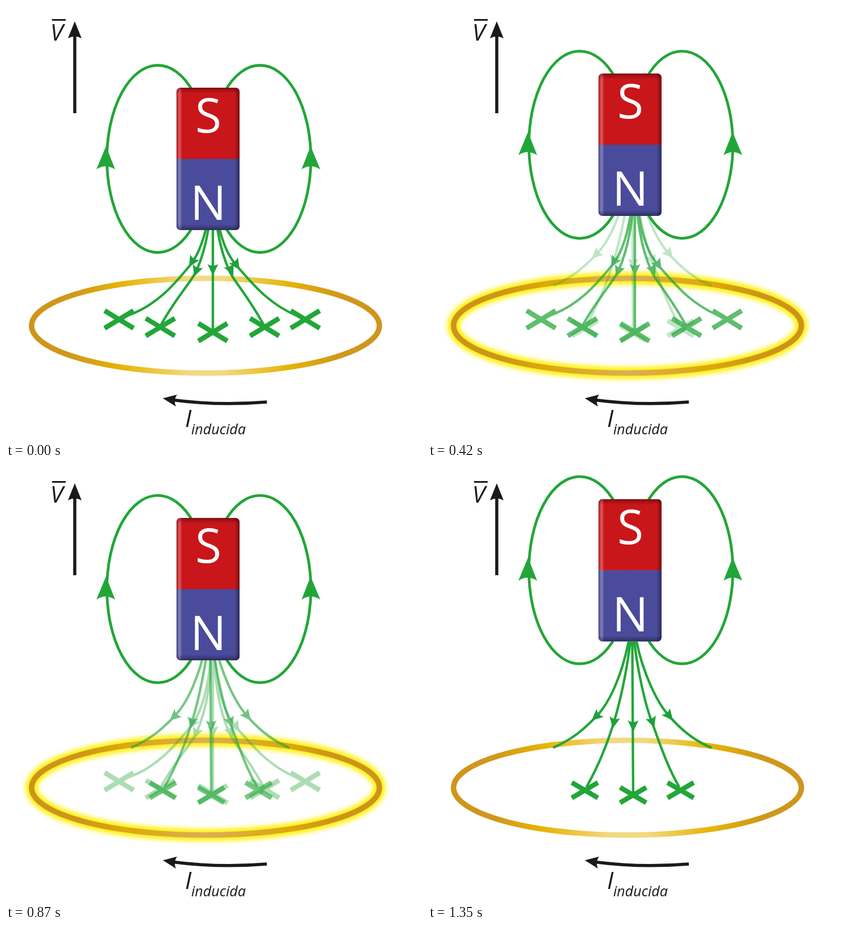
An HTML page for the animation above (1800 ms loop, 732 px wide and 765 px high).

```html
<!DOCTYPE html>
<html lang="es">
<head>
<meta charset="utf-8">
<title>Corriente inducida</title>
<style>
  html, body { margin: 0; width: 100%; height: 100%; overflow: hidden; background: #fff; }
  svg { display: block; width: 100vw; height: 100vh; }
  text { font-family: "Open Sans", "Noto Sans", sans-serif; }
  .line { fill: none; stroke: #22a638; stroke-width: 4.3; }
  .cross { fill: none; stroke: #22a638; stroke-width: 8.5; }
  .head { fill: #1da03c; }
  .loop { fill: none; stroke: #22a638; stroke-width: 4.8; }
  .pole { font-size: 84px; fill: #fff; text-anchor: middle; }
  .label { font-style: italic; fill: #1a1a18; }
  .ink { fill: none; stroke: #1a1a18; stroke-width: 5.5; }
</style>
</head>
<body>
<svg viewBox="0 0 732 765">
  <defs>
    <linearGradient id="gold">
      <stop offset="0" stop-color="#cf951c"/>
      <stop offset=".12" stop-color="#d0981b"/>
      <stop offset=".26" stop-color="#e6b406"/>
      <stop offset=".45" stop-color="#f3d981"/>
      <stop offset=".55" stop-color="#f3d981"/>
      <stop offset=".74" stop-color="#e6b406"/>
      <stop offset=".88" stop-color="#d0981b"/>
      <stop offset="1" stop-color="#cf951c"/>
    </linearGradient>
    <linearGradient id="amber">
      <stop offset="0" stop-color="#cd931b"/>
      <stop offset=".14" stop-color="#cd951a"/>
      <stop offset=".26" stop-color="#dca80c"/>
      <stop offset=".5" stop-color="#dcae55"/>
      <stop offset=".74" stop-color="#dca80c"/>
      <stop offset=".86" stop-color="#cd951a"/>
      <stop offset="1" stop-color="#cd931b"/>
    </linearGradient>
    <linearGradient id="sides">
      <stop offset="0" stop-opacity=".35"/>
      <stop offset=".025" stop-color="#fff" stop-opacity=".12"/>
      <stop offset=".05" stop-color="#fff" stop-opacity=".3"/>
      <stop offset=".09" stop-color="#fff" stop-opacity="0"/>
      <stop offset=".92" stop-opacity="0"/>
      <stop offset=".97" stop-opacity=".25"/>
      <stop offset="1" stop-opacity=".4"/>
    </linearGradient>
    <linearGradient id="ends" x2="0" y2="1">
      <stop offset="0" stop-opacity=".35"/>
      <stop offset=".04" stop-opacity="0"/>
      <stop offset=".96" stop-opacity="0"/>
      <stop offset="1" stop-opacity=".4"/>
    </linearGradient>
    <clipPath id="body"><rect x="300" y="144" width="111" height="251" rx="7"/></clipPath>
    <filter id="blur" x="-10%" y="-25%" width="120%" height="150%"><feGaussianBlur stdDeviation="4.5"/></filter>
  </defs>

  <g fill="none" stroke-width="9.6">
    <ellipse id="glow" cx="351" cy="563.5" rx="306" ry="83.5" stroke="#fff000" stroke-width="21" filter="url(#blur)"/>
    <ellipse id="ring" cx="351" cy="563.5" rx="306" ry="83.5"/>
  </g>

  <g id="near">
    <path class="line" d="M361 310C360 365 350 425 323 458S265 528 213 546
      M362 310C362 365 356 420 335 467C325 488 302 510 272 563
      M364 310V574
      M366 310C366 365 372 420 393 467C403 488 425 510 454 563
      M367 310C367 365 377 425 406 458S462 525 512 546"/>
  </g>
  <g id="far">
    <path class="line" d="M353 306C340 370 318 415 297 437S255 478 220 493
      M356 306C351 350 340 405 328 445S300 525 279 562
      M359.500 306L361 575
      M363 306C368 350 380 410 393 445S420 525 442 562
      M367 306C378 360 402 412 424 437S470 482 499 493"/>
  </g>

  <g id="magnet">
    <ellipse class="loop" cx="267" cy="269.500" rx="89.500" ry="165"/>
    <ellipse class="loop" cx="447" cy="269.500" rx="89.500" ry="165"/>
    <path fill="#22a638" d="M176 247L192 288Q175 277 159 288ZM536 247L553 288Q536 277 520 288Z"/>
    <g clip-path="url(#body)">
      <path fill="#c9161b" d="M300 144h111v126h-111z"/>
      <path fill="#4b4b9c" d="M300 269.500h111v126h-111z"/>
      <path fill="url(#sides)" d="M300 144h111v251h-111z"/>
      <path fill="url(#ends)" d="M300 144h111v251h-111z"/>
    </g>
    <text class="pole" x="356" y="223">S</text>
    <text class="pole" x="356" y="377">N</text>
  </g>

  <path class="ink" d="M121 189V48M459 698Q375 705 294 694.500"/>
  <path fill="#1a1a18" d="M121 27L133 57Q121 50 109 57ZM276 691.500L301 685Q294 695 299 706Z"/>
  <path class="ink" stroke-width="3" style="stroke-width:3" d="M81 24.500H105"/>
  <text class="label" x="78" y="61" font-size="41">V</text>
  <text class="label" x="315" y="742" font-size="42">I</text>
  <text class="label" x="326" y="755" font-size="25">inducida</text>
</svg>
<script>
const $ = id => document.getElementById(id);

function add(group, className, d, transform) {
  const path = document.createElementNS("http://www.w3.org/2000/svg", "path");
  path.setAttribute("class", className);
  path.setAttribute("d", d);
  path.setAttribute("transform", transform);
  group.append(path);
}

// heads: [tip x, tip y, angle]; crosses: [centre x, centre y]
function decorate(group, heads, crosses, w, h) {
  for (const [x, y, angle] of heads)
    add(group, "head", "M0 0L-20 -9.500Q-14 0 -20 9.500Z", `translate(${x} ${y}) rotate(${angle})`);
  for (const [x, y] of crosses)
    add(group, "cross", `M${-w} ${-h}L${w} ${h}M${-w} ${h}L${w} ${-h}`, `translate(${x} ${y})`);
}

decorate($("near"),
  [[322, 460, 121], [331, 477, 110], [364, 475, 90], [400, 475, 66], [411, 465, 57]],
  [[199, 552.5], [271.5, 566], [364, 575], [455, 566], [526.5, 552.5]], 25.5, 15.5);
decorate($("far"),
  [[288, 445, 138], [325, 459, 101], [361, 465, 90], [398, 458, 72], [431, 445, 51]],
  [[276, 568], [361, 576.5], [444.5, 568]], 23, 13.5);

const LOOP = 1800, STEP = 30, STEPS = 43, RISE = 89.3;

function draw(now) {
  const step = Math.floor((now % LOOP) / STEP) - 2;
  const p = Math.min(1, Math.max(0, step / STEPS));
  const moving = p > 0 && p < 1;
  $("magnet").setAttribute("transform", `translate(0 ${-RISE * p})`);
  $("near").setAttribute("opacity", 1 - p);
  $("far").setAttribute("opacity", p);
  $("glow").setAttribute("visibility", moving ? "visible" : "hidden");
  $("ring").setAttribute("stroke", moving ? "url(#amber)" : "url(#gold)");
}

const start = performance.now();
function tick() {
  draw(performance.now() - start);
  requestAnimationFrame(tick);
}
tick();
</script>
</body>
</html>
```
